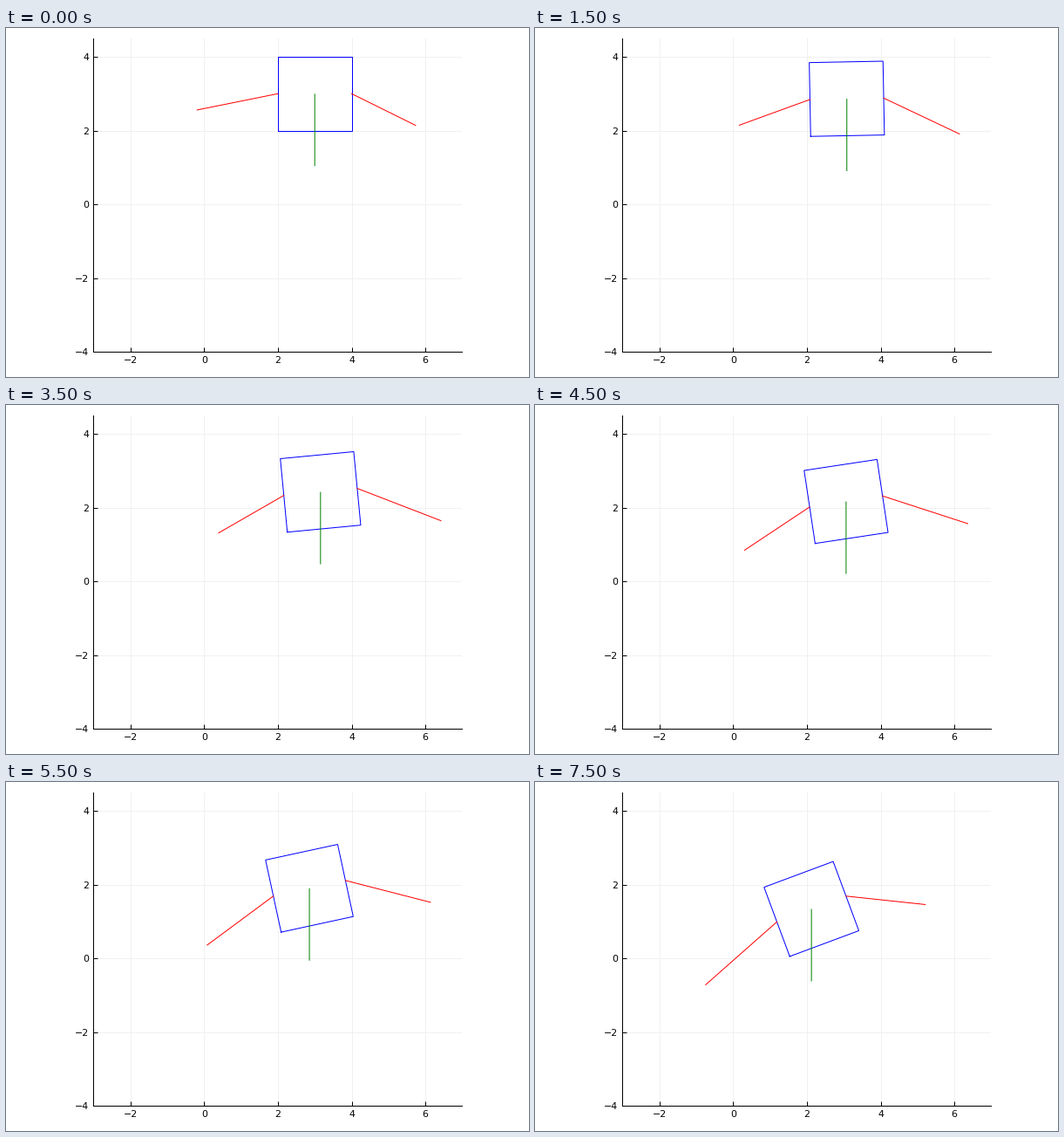
These frames come from a looping animation (600x400 px, 8 s). A matplotlib script:

```python
import numpy as np
import matplotlib.pyplot as plt
from matplotlib.animation import FuncAnimation

W, H, DPI = 600, 400, 100
FRAMES, STEP_MS = 16, 500
PX = 72 / DPI     # one pixel in points
UNIT = 42.3       # pixels per data unit
LEFT, BOTTOM = 100.4, H - 371.4
GRAVITY = np.array([0, -9.8 / 5])
SQUARE = np.array([[-1, -1], [1, -1], [1, 1], [-1, 1], [-1, -1]])

plt.rcParams["font.family"] = "DejaVu Sans"


# Motion over the loop, with u running from 0 to 1.
# The box starts at rest; the force tips move from the first moment.
def center(u):
    return np.array([3 + u**2 * (3.372 - 6.941 * u + 2.693 * u**2),
                     3 - u**2 * (4.189 - 4.013 * u + 1.484 * u**2)])


def angle(u):
    return u**2 * (0.506 - 0.150 * u)


def left_tip(u):
    return (-0.187 + u * (1.779 + 1.064 * u - 5.933 * u**2 + 2.531 * u**3),
            2.560 - u * (1.288 + 4.768 * u - 4.806 * u**2 + 2.025 * u**3))


def right_tip(u):
    return (5.735 + u * (2.012 + 1.046 * u - 5.707 * u**2 + 2.126 * u**3),
            2.142 - u * (1.049 + 1.087 * u - 2.973 * u**2 + 1.519 * u**3))


fig = plt.figure(figsize=(W / DPI, H / DPI), dpi=DPI, facecolor="white")
ax = fig.add_axes([LEFT / W, BOTTOM / H, 10 * UNIT / W, 8.5 * UNIT / H])
ax.set(xlim=(-3, 7), ylim=(-4, 4.5),
       xticks=range(-2, 7, 2), yticks=range(-4, 5, 2))
ax.set_axisbelow(True)
ax.grid(color="#f0f0f0", linewidth=PX)
ax.tick_params(direction="in", length=5 * PX, width=PX, pad=5 * PX,
               labelsize=11 * PX)
ax.spines[["top", "right"]].set_visible(False)
ax.spines[["left", "bottom"]].set_linewidth(PX)


def line(color, **kw):
    return ax.plot([], [], color=color, lw=PX, clip_on=False, **kw)[0]


box = line("blue", solid_joinstyle="miter")
left_force, right_force = line("red"), line("red")
weight = line("green", snap=False, solid_capstyle="butt")


def join(segment, start, end):
    segment.set_data(*zip(start, end))


def draw(n):
    u = n / (FRAMES - 1)
    c, a = center(u), angle(u)
    side = np.array([np.cos(a), np.sin(a)])
    up = np.array([-side[1], side[0]])

    box.set_data(*(c + SQUARE @ np.array([side, up])).T)
    join(left_force, c - side, left_tip(u))
    join(right_force, c + side, right_tip(u))
    join(weight, c, c + GRAVITY)
    return box, left_force, right_force, weight


anim = FuncAnimation(fig, draw, frames=FRAMES, interval=STEP_MS,
                     repeat=True, repeat_delay=0)
plt.show()
```
